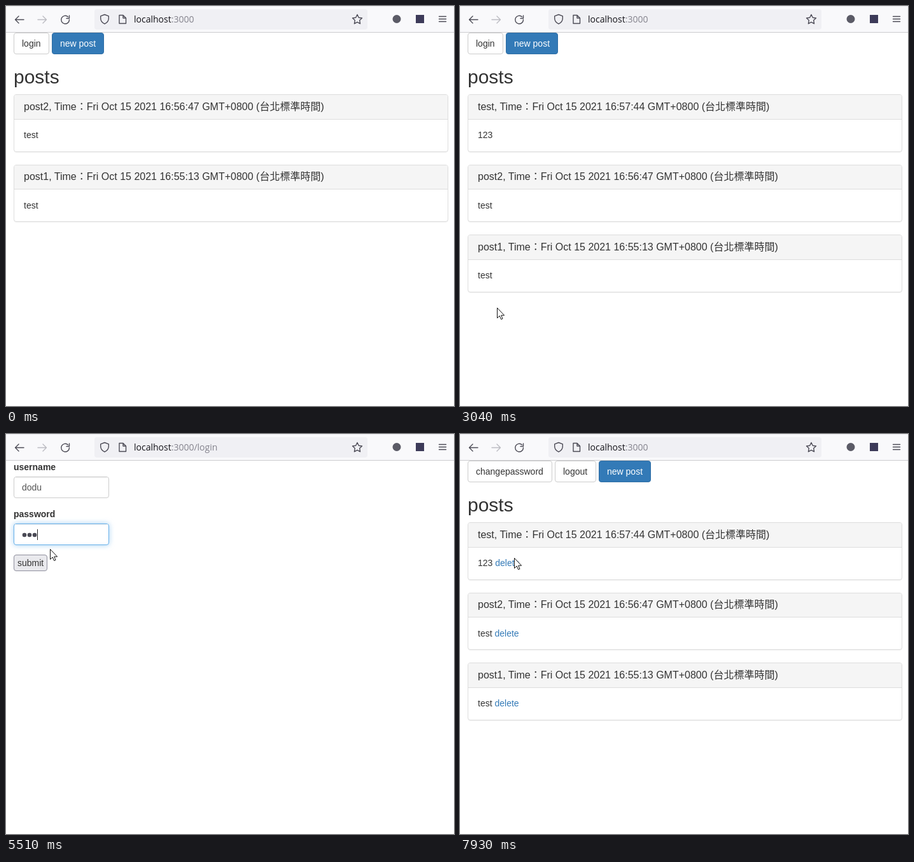
An HTML page for the animation above (8000 ms loop, 704x630 px).

```html
<!DOCTYPE html>
<html lang="zh-Hant">
<head>
<meta charset="utf-8">
<title>Message board</title>
<style>
html, body { margin: 0; width: 100%; height: 100%; overflow: hidden; background: #fff; }
svg { display: block; width: 704px; height: 630px; }
text { font: 14px "Liberation Sans", Arial, "Noto Sans CJK TC", "Noto Sans CJK", sans-serif; fill: #333; white-space: pre; }
.ui { font-family: "Open Sans", "Noto Sans", sans-serif; fill: #15141a; }
.h1 { font-size: 36px; }
.h2 { font-size: 30px; }
.head { font-size: 16px; }
.cjk { font-family: "Noto Sans CJK TC", "Noto Sans CJK", sans-serif; font-weight: 300; }
.bold { font-weight: 700; }
.link { fill: #337ab7; }
.icon { fill: none; stroke: #4c4b56; stroke-width: 1.4; stroke-linecap: round; stroke-linejoin: round; }
.btn rect { fill: #fff; stroke: #ccc; }
.primary rect { fill: #337ab7; stroke: #2e6da4; }
.primary text { fill: #fff; }
.plain rect { fill: #e9e9ed; stroke: #8f8f9d; }
.hot .target rect { fill: #e6e6e6; stroke: #adadad; }
.hot .target.primary rect { fill: #286090; stroke: #204d74; }
.hot .target.plain rect { fill: #d0d0d7; stroke: #676774; }
.field .box { fill: #fff; stroke: #ccc; }
.field text { fill: #555; }
.field .hint { fill: #999; }
.field.area .box { stroke: #8f8f9d; }
.field.area .hint { fill: #888; }
.focus .box { stroke: #66afe9; filter: drop-shadow(0 0 4px rgba(102, 175, 233, .6)); }
.focus.area .box { stroke: #0060df; stroke-width: 2; filter: none; }
.caret { fill: #222; visibility: hidden; }
.focus .caret { visibility: visible; }
#panel { filter: drop-shadow(0 2px 6px rgba(0, 0, 0, .3)); }
.pointer path { fill: #fff; stroke: #111; stroke-linejoin: round; }
</style>
</head>
<body>
<svg id="stage" viewBox="0 0 704 630" xmlns="http://www.w3.org/2000/svg">
  <rect width="704" height="630" fill="#fff"/>
  <g id="pages"></g>

  <g id="dialog">
    <rect y="41" width="704" height="589" fill="#1c1b22" opacity=".45"/>
    <rect id="panel" x="150" y="273" width="408" height="130" rx="8" fill="#fff"/>
    <g class="icon" style="stroke:#15141a">
      <circle cx="174.5" cy="297.5" r="7"/>
      <ellipse cx="174.5" cy="297.5" rx="3.2" ry="7"/>
      <path d="M168 297.5h13"/>
    </g>
    <text class="ui" x="186" y="302" style="font-size:12px;font-weight:600">localhost:3000</text>
    <text class="ui" x="166" y="336" style="font-size:12.2px">button clicked</text>
    <rect id="ok" x="486" y="355" width="56" height="32" rx="4"/>
    <text class="cjk" x="514" y="376" text-anchor="middle" style="font-size:12px;font-weight:700;fill:#fff">確定</text>
  </g>

  <g id="toolbar">
    <rect width="704" height="41" fill="#f9f9fb"/>
    <rect width="704" height="1" fill="#ededf0"/>
    <rect y="41" width="704" height="1" fill="#cccccf"/>
    <rect x="139" y="5" width="429" height="32" rx="4" fill="#f0f0f4"/>
    <g class="icon">
      <path d="M28 21.5H14.5m5.5-5.5l-5.5 5.5 5.5 5.5"/>
      <path d="M50 21.5h13.500m-5.500-5.500l5.500 5.500-5.500 5.500" stroke="#bcbcc2"/>
      <path d="M97.500 17a6.400 6.400 0 1 0 2 4.500M99.500 15v4.500H95"/>
      <path d="M155 13.500l6.300 2.300v3.700c0 4-2.500 6.800-6.300 8.700-3.800-1.900-6.300-4.700-6.300-8.700v-3.700z"/>
      <path d="M178 14.500h6l4.500 4.500v8.500H178zM184 14.500V19h4.500"/>
      <path d="M552 13.500l2.300 4.800 5.200.7-3.800 3.600.9 5.200-4.600-2.500-4.600 2.500.9-5.200-3.800-3.600 5.200-.7z"/>
      <path d="M680.500 16.500h11M680.500 20.500h11M680.500 24.500h11"/>
    </g>
    <circle cx="614" cy="20.500" r="6.500" fill="#5b5b66"/>
    <rect x="644" y="14" width="13" height="13" fill="#3d3b59"/>
    <text class="ui" x="201" y="26">localhost<tspan id="path" fill="#84838d"></tspan></text>
  </g>

  <g id="cursor" class="pointer">
    <path id="arrow" d="M.5.500V16.500L4.200 13 6.600 18.500 9 17.500 6.700 12.200H11.600Z"/>
    <path id="beam" d="M-3 -7.500H-1Q.5-7.500.5-6Q.5-7.500 2-7.500H4M.5-6V6M-3 7.500H-1Q.5 7.500.5 6Q.5 7.500 2 7.500H4" style="fill:none"/>
    <path id="hand" d="M-1.500 12V1.500a1.500 1.500 0 0 1 3 0V8a1.500 1.500 0 0 1 3 0v.5a1.500 1.500 0 0 1 3 .5v.5a1.400 1.400 0 0 1 2.800.5v5l-2 6.500H-.5L-5.500 13.500c-1.500-2.500 1-3.500 2-2.500z"/>
  </g>
</svg>

<script>
const LOOP = 8000;
const $ = id => document.getElementById(id);

const text = (x, y, s, cls = '') => `<text class="${cls}" x="${x}" y="${y}">${s}</text>`;
const box = (x, y, w, h, attrs) =>
  `<rect x="${x + .5}" y="${y + .5}" width="${w - 1}" height="${h - 1}" ${attrs}/>`;

const button = (x, y, w, h, label, cls = '', pad = 13) =>
  `<g class="btn ${cls}">${box(x, y, w, h, 'rx="3.500"')}${text(x + pad, y + h / 2 + 5, label)}</g>`;

function field(id, y, hint, w = 150, h = 34, area = false) {
  const x = area ? 16 : 25, base = y + (area ? 18 : 22);
  return `<g id="${id}" class="field ${area ? 'area' : ''}">
    ${box(12, y, w, h, `class="box" rx="${area ? 0 : 3.5}"`)}
    ${area ? '' : `<rect x="14" y="${y + 1}" width="${w - 4}" height="1" fill="#eee"/>`}
    ${text(x, base, hint, 'hint')}${text(x, base, '', 'value')}
    <rect class="caret" x="${x}" y="${base - 13}" width="1" height="17"/></g>`;
}

function post([author, clock, body], i, canDelete) {
  const y = 110.5 * i;
  const top = Math.round(139 + y), line = Math.floor(178 + y), bottom = Math.floor(230 + y);
  return box(12, top + 1, 683, bottom - top, 'rx="3.500" fill="none" stroke="#f2f2f2"') +
    box(12, top, 683, bottom - top, 'rx="3.500" fill="#fff" stroke="#ddd"') +
    `<path d="M13 ${line}V${top + 4}q0-3 3-3H691q3 0 3 3V${line}z" fill="#f5f5f5"/>
     <rect x="13" y="${line}" width="681" height="1" fill="#ddd"/>` +
    text(28, Math.floor(164 + y), `${author}, Time<tspan class="cjk">：</tspan>Fri Oct 15 2021 ${clock} ` +
      'GMT+0800 (<tspan class="cjk">台北標準時間</tspan>)', 'head') +
    text(28, Math.round(208 + y), body + (canDelete ? ' <tspan class="link">delete</tspan>' : ''));
}

const oldPosts = [['post2', '16:56:47', 'test'], ['post1', '16:55:13', 'test']];
const allPosts = [['test', '16:57:44', '123'], ...oldPosts];
const board = (buttons, posts, canDelete) =>
  buttons + text(12, 122, 'posts', 'h2') + posts.map((p, i) => post(p, i, canDelete)).join('');
const guestBar = (loginCls, postCls) =>
  button(12, 42, 56, 34, 'login', loginCls) + button(72, 42, 82, 34, 'new post', 'primary ' + postCls);

const pages = {
  guest: board(guestBar('', 'target'), oldPosts),
  compose: text(12, 93, 'New Message', 'h1') + text(12, 126, 'Author', 'bold') +
    field('author', 137, 'author') + text(12, 200, 'content', 'bold') +
    field('content', 221, 'please enter content', 349, 225, true) +
    '<path d="M345 442l12-12M349 442l8-8M353 442l4-4" stroke="#555" stroke-width="1.300"/>' +
    button(12, 462, 67, 34, 'submit', 'target'),
  posted: board(guestBar('target', ''), allPosts),
  login: text(12, 57, 'username', 'bold') + field('user', 67, '') +
    text(12, 131, 'password', 'bold') + field('secret', 141, 'Password') +
    '<g id="dots" fill="#4a4a55">' +
      [29, 37, 45].map(x => `<circle cx="${x}" cy="159" r="3.300"/>`).join('') + '</g>' +
    button(12, 190, 53, 26, 'submit', 'plain target', 6) +
    `<g id="suggest">${box(12, 101, 150, 22, 'fill="#fff" stroke="#a0a0a8"')}` +
      '<text class="ui" x="18" y="117" style="font-size:12px">dodu</text></g>',
  member: board(button(12, 42, 133, 34, 'changepassword') + button(149, 42, 65, 34, 'logout') +
    button(218, 42, 82, 34, 'new post', 'primary'), allPosts, true)
};
$('pages').innerHTML = Object.entries(pages).map(([id, body]) => `<g id="${id}">${body}</g>`).join('');

// Tracks hold [start time, value]
const pageTrack = [[0, 'guest'], [1010, 'compose'], [2880, 'posted'], [3760, 'login'], [6690, 'member']];
const focusTrack = [[0, ''], [1230, 'author'], [2010, 'content'], [2600, ''], [4050, 'user'], [5090, 'secret'], [5700, '']];
const kindTrack = [[0, ''], [70, 'arrow'], [700, 'hand'], [1010, 'arrow'], [1190, 'beam'], [1880, 'arrow'],
  [1930, 'beam'], [2420, 'arrow'], [2470, 'hand'], [2880, 'arrow'], [3570, 'hand'], [3760, 'arrow'],
  [3920, 'beam'], [5500, 'arrow'], [5560, 'hand'], [5780, 'arrow']];
const pathKeys = [[70, 529, 524], [750, 112, 62], [960, 112, 62], [1230, 108, 144], [1800, 108, 144],
  [2000, 120, 280], [2290, 120, 280], [2490, 56, 468], [2600, 51, 490], [2900, 51, 490], [3040, 58, 475],
  [3310, 128, 400], [3620, 40, 62], [3800, 40, 62], [4050, 84, 92], [4700, 84, 92], [4960, 84, 158],
  [5400, 84, 158], [5640, 51, 210], [5990, 51, 210], [6420, 497, 374], [6690, 497, 374], [6750, 481, 366],
  [6960, 300, 230], [7160, 110, 90], [7380, 57, 130], [7580, 105, 154], [7930, 85, 195]];

const at = (track, t) => track.filter(k => k[0] <= t).pop()[1];
const typed = (word, start, step, t) =>
  word.slice(0, Math.max(0, Math.floor((t - start) / step) + 1));
const show = (id, on) => { $(id).style.display = on ? '' : 'none'; };

function cursorAt(t) {
  const i = pathKeys.findIndex(k => k[0] > t);
  if (i < 1) return (i ? pathKeys.at(-1) : pathKeys[0]).slice(1);
  const [t0, x0, y0] = pathKeys[i - 1], [t1, x1, y1] = pathKeys[i];
  const p = (t - t0) / (t1 - t0), e = p * p * (3 - 2 * p);
  return [Math.round(x0 + (x1 - x0) * e), Math.round(y0 + (y1 - y0) * e)];
}

function setField(id, value, focus, hidden = false) {
  const el = $(id), label = el.querySelector('.value'), caret = el.querySelector('.caret');
  const x = +label.getAttribute('x');
  el.classList.toggle('focus', focus === id);
  el.querySelector('.hint').style.display = value ? 'none' : '';
  if (!hidden) label.textContent = value;
  const width = hidden ? value.length * 8 : value ? label.getComputedTextLength() : 0;
  caret.setAttribute('x', Math.round(x + width));
}

function render(t) {
  const page = at(pageTrack, t), focus = at(focusTrack, t), kind = at(kindTrack, t);
  for (const id in pages) show(id, id === page);
  $('path').textContent = ':3000' + ({ compose: '/posts', login: '/login' }[page] || '');

  if (page === 'compose') {
    setField('author', typed('test', 1500, 90, t), focus);
    setField('content', typed('123', 2120, 70, t), focus);
  }
  if (page === 'login') {
    const secret = typed('123', 5220, 70, t);
    setField('user', typed('dodu', 4270, 140, t), focus);
    setField('secret', secret, focus, true);
    [...$('dots').children].forEach((dot, i) => { dot.style.display = i < secret.length ? '' : 'none'; });
    show('suggest', t >= 4270 && t < 4700);
  }

  $('stage').classList.toggle('hot', kind === 'hand' || (t >= 5560 && t < 6690));
  show('dialog', t >= 5780 && t < 6550);
  $('ok').setAttribute('fill', t > 6370 ? '#0250bb' : '#0061e0');

  for (const id of ['arrow', 'beam', 'hand']) show(id, id === kind);
  $('cursor').setAttribute('transform', `translate(${cursorAt(t)})`);
}

function tick() {
  render(performance.now() % LOOP);
  requestAnimationFrame(tick);
}
tick();
</script>
</body>
</html>
```
